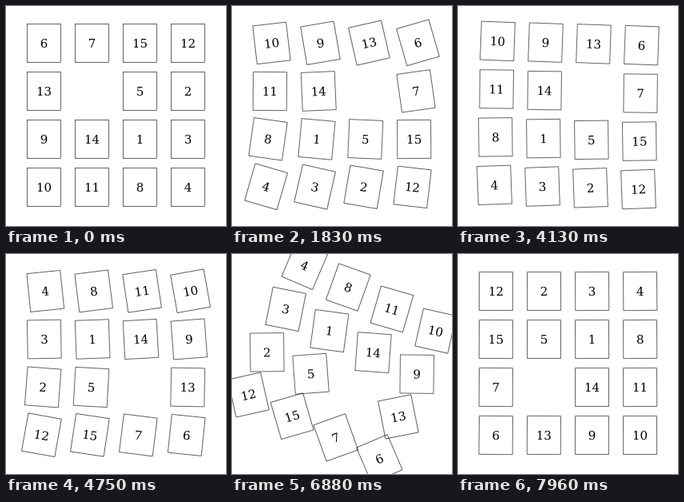
An HTML page with a canvas that plays this animation: 275x275 px, repeating every 8000 ms.

```html
<!DOCTYPE html>
<html lang="en">
<head>
<meta charset="utf-8">
<title>Hanging tiles</title>
<style>
  html, body { margin: 0; width: 100%; height: 100%; overflow: hidden; background: #fff; }
  canvas { display: block; }
</style>
</head>
<body>
<canvas id="stage" width="275" height="275"></canvas>
<script>
const ctx = document.getElementById('stage').getContext('2d');

const LOOP = 8000;
const TURN_STARTS = [1247, 4125, 6784.5];
const TURN_TIME = 325;
const HISTORY = 3000;

// Each tile hangs from a pin above its middle; the pins turn as one rigid grid.
const CENTER = { x: 137.5, y: 119 };
const SPACING = 60;
const TILE = { w: 42, h: 48, drop: 17.5 };
const SWING = { length: 71, gravity: 6550, damping: 10 };

const START = [
  [6, 7, 15, 12],
  [13, 0, 5, 2],
  [9, 14, 1, 3],
  [10, 11, 8, 4],
];

const turnClockwise = grid => grid.map((row, r) => row.map((_, c) => grid[3 - c][r]));
const layouts = [START];
while (layouts.length < TURN_STARTS.length) layouts.push(turnClockwise(layouts.at(-1)));

const offset = index => (index - 1.5) * SPACING;
const turnAngle = ms => Math.PI / 2 * Math.min(Math.max(ms / TURN_TIME, 0), 1);

// Tilt of one damped pendulum, per millisecond, while its pin is carried through a quarter turn.
function simulateTilt(x, y) {
  const dt = 0.001;
  const omega = Math.PI / 2 / (TURN_TIME * dt);
  const tilts = new Float32Array(HISTORY);
  let tilt = 0, speed = 0, lastPinSpeed = 0;
  for (let ms = 0; ms < HISTORY; ms++) {
    tilts[ms] = tilt;
    const angle = turnAngle(ms);
    const pinSpeed = ms < TURN_TIME ? -omega * (x * Math.sin(angle) + y * Math.cos(angle)) : 0;
    const push = (pinSpeed - lastPinSpeed) * Math.cos(tilt);
    const pull = SWING.gravity * Math.sin(tilt) * dt;
    speed += (push - pull) / SWING.length - SWING.damping * speed * dt;
    tilt += speed * dt;
    lastPinSpeed = pinSpeed;
  }
  return tilts;
}

const tiltTable = START.map((row, r) => row.map((_, c) => simulateTilt(offset(c), offset(r))));

function drawTile(label, x, y, tilt) {
  ctx.save();
  ctx.translate(x, y);
  ctx.rotate(tilt);
  ctx.translate(0, TILE.drop);
  ctx.strokeRect(-TILE.w / 2, -TILE.h / 2, TILE.w, TILE.h);
  ctx.fillText(label, 0, 5.5);
  ctx.restore();
}

function draw(time) {
  const turn = Math.max(0, TURN_STARTS.findLastIndex(start => time >= start));
  const elapsed = Math.max(0, time - TURN_STARTS[turn]);
  const angle = turnAngle(elapsed);
  const cos = Math.cos(angle), sin = Math.sin(angle);
  const step = Math.min(Math.floor(elapsed), HISTORY - 1);

  ctx.fillStyle = '#fff';
  ctx.fillRect(0, 0, 275, 275);
  ctx.fillStyle = '#000';
  ctx.strokeStyle = '#000';
  ctx.lineWidth = 0.6;
  ctx.font = '15px "DejaVu Serif", serif';
  ctx.textAlign = 'center';

  layouts[turn].forEach((row, r) => row.forEach((label, c) => {
    if (!label) return;
    const x = offset(c), y = offset(r);
    drawTile(label, CENTER.x + x * cos - y * sin, CENTER.y + x * sin + y * cos, tiltTable[r][c][step]);
  }));
}

const origin = performance.now();
function tick() {
  draw((performance.now() - origin) % LOOP);
  requestAnimationFrame(tick);
}
tick();
</script>
</body>
</html>
```
